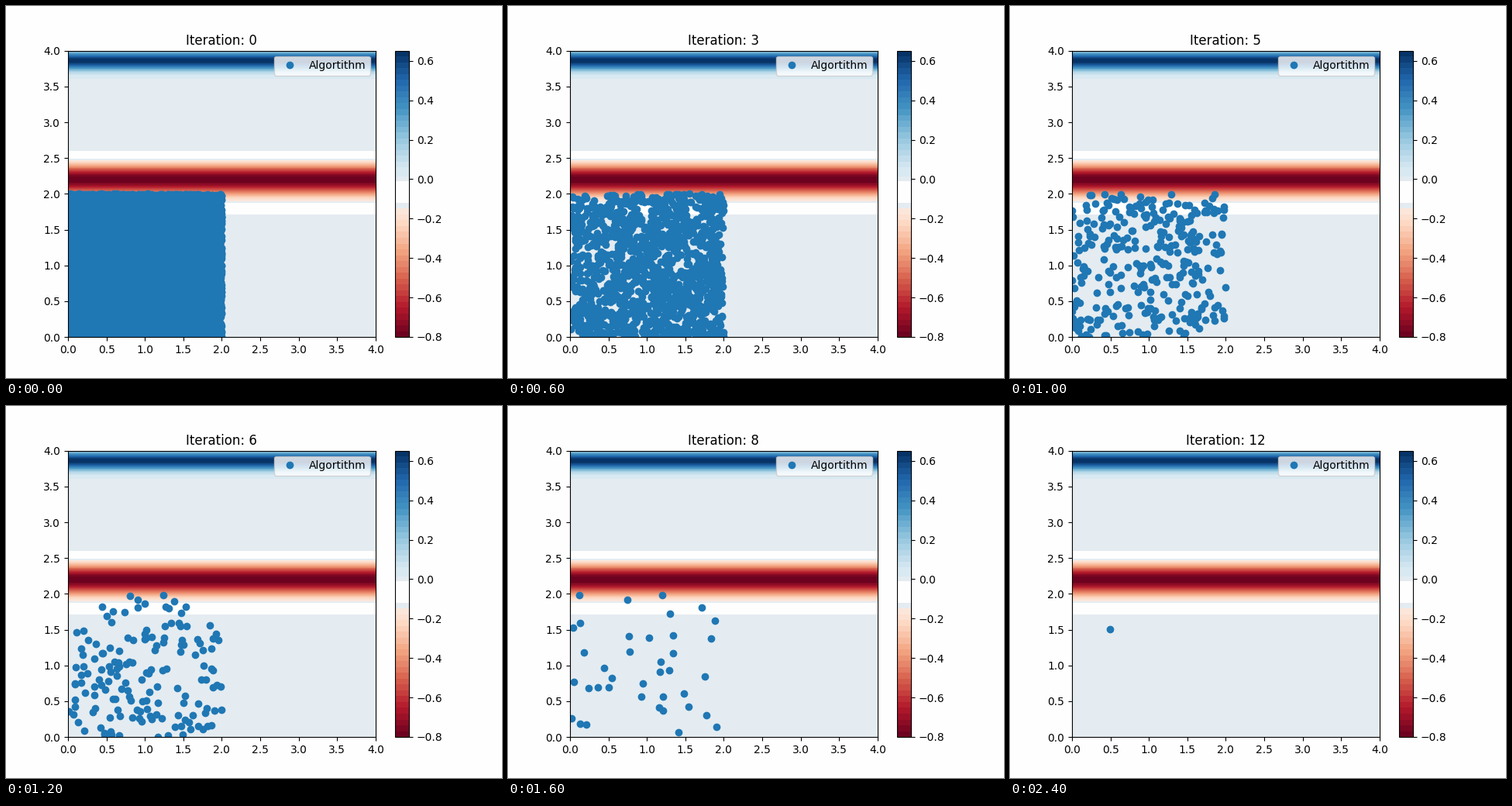
Write a matplotlib script that moves like this. It is 640x480 px and loops after 2.6 s.

```python
import numpy as np
import matplotlib.pyplot as plt
from matplotlib.animation import FuncAnimation

PAGE = "#fefefe"
PALE = "#e4ecf1"
START_COUNT = 10000
BANDS = 49
LAST_POINT = (0.49, 1.505)


def objective(y):
    return -np.sin(y) * np.sin(y**2 / np.pi) ** 20


def population(iteration):
    """Uniform points on a 2 x 2 square, about half as many each time."""
    count = ((START_COUNT + 1) >> iteration) - 1
    if count == 1:
        return np.array([LAST_POINT])
    rng = np.random.default_rng(40 + iteration)
    return rng.uniform(0, 2, (count, 2))


def draw_field(fig, ax):
    y = np.linspace(0, 4, 1601)
    z = objective(y)
    levels = np.linspace(z.min() - 1e-4, z.max() + 1e-4, BANDS + 1)
    # The pale band around zero starts slightly below it.
    levels[27:29] = -0.0113, 0.0145
    colors = list(plt.get_cmap("RdBu")((np.arange(BANDS) + 0.5) / BANDS))
    colors[22:28] = [PALE] + [PAGE] * 4 + [PALE]
    field = ax.contourf([0, 4], y, np.column_stack([z, z]),
                        levels=levels, colors=colors)
    fig.colorbar(field, ax=ax, spacing="proportional",
                 ticks=np.linspace(-0.8, 0.6, 8).round(1))


fig, ax = plt.subplots(figsize=(6.4, 4.8), dpi=100, facecolor=PAGE)
draw_field(fig, ax)
dots, = ax.plot([], [], "o", color="C0", label="Algortithm")
ticks = np.arange(0, 4.1, 0.5)
ax.set(xlim=(0, 4), ylim=(0, 4), xticks=ticks, yticks=ticks)
ax.legend(loc="upper right")
title = ax.set_title("Iteration: 0", pad=5.3)


def update(iteration):
    dots.set_data(*population(iteration).T)
    title.set_text(f"Iteration: {iteration}")
    return dots, title


animation = FuncAnimation(fig, update, frames=13, interval=200,
                          repeat=True, repeat_delay=0)
plt.show()
```
